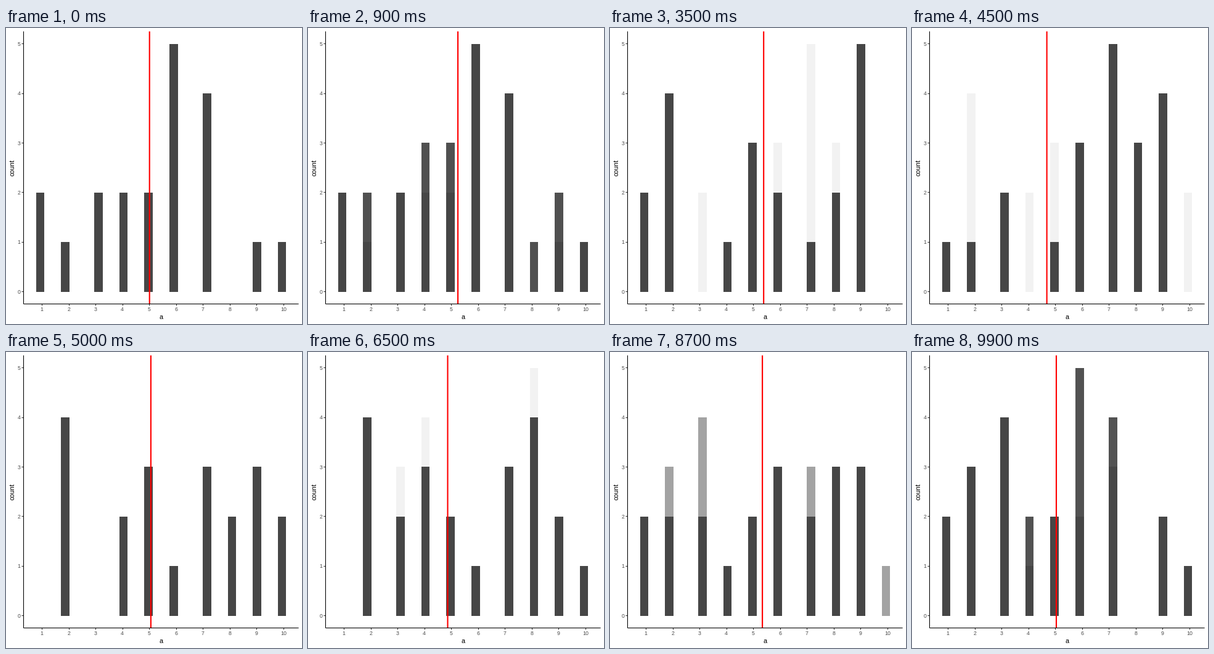
Animation of 480x480 px, one loop 10 s. Source, as a matplotlib script:

```python
import math

import matplotlib.pyplot as plt
from matplotlib.animation import FuncAnimation
from matplotlib.patches import Rectangle

plt.rcParams["font.family"] = "Liberation Sans"

SIZE = 480
LEFT, RIGHT, TOP, BOTTOM = 28.5, 474.5, 5.5, 447.7
STATES, STEP = 10, 10    # states in a loop, frames per state
BIN = 9 / 29             # 30 bins over the values 1 to 10

# Counts of the values 1 to 10; states left out lie between their neighbours
KEYS = {
    0: (2, 1, 2, 2, 2, 5, 4, 0, 1, 1),
    2: (2, 3, 1, 4, 4, 1, 2, 1, 2, 0),
    3: (2, 4, 0, 1, 3, 2, 1, 2, 5, 0),
    4: (1, 1, 2, 0, 1, 3, 5, 3, 4, 0),
    5: (0, 4, 0, 2, 3, 1, 3, 2, 3, 2),
    7: (0, 3, 3, 4, 1, 1, 2, 5, 1, 0),
    8: (2, 2, 2, 1, 2, 3, 2, 3, 3, 0),
    9: (2, 3, 4, 1, 2, 2, 3, 0, 2, 1),
}
MARKS = (5.0, 5.25, 6.05, 5.43, 4.65, 5.05, 4.75, 6.35, 5.22, 5.44)

CENTERS = [round(v / BIN) * BIN for v in range(1, 11)]
X_MIN, X_MAX = CENTERS[0] - BIN / 2, CENTERS[-1] + BIN / 2
PAD = 0.05 * (X_MAX - X_MIN)
X_UNIT = (RIGHT - LEFT) / (X_MAX - X_MIN + 2 * PAD)
Y_UNIT = (BOTTOM - TOP) / 5.5


def px(x):
    return LEFT + (x - X_MIN + PAD) * X_UNIT


def py(y):
    return BOTTOM - (y + 0.25) * Y_UNIT


def counts(state):
    if state in KEYS:
        return KEYS[state]
    pairs = zip(KEYS[state - 1], KEYS[state + 1])
    return [(a + b + 1) // 2 for a, b in pairs]


fig = plt.figure(figsize=(SIZE / 72, SIZE / 72), dpi=72, facecolor="white")
ax = fig.add_axes([0, 0, 1, 1])
ax.set_xlim(0, SIZE)
ax.set_ylim(SIZE, 0)
ax.axis("off")


def make_bars(zorder):
    return [ax.add_patch(Rectangle((px(c - BIN / 2), py(0)), BIN * X_UNIT, 0,
                                   facecolor="#464646", linewidth=0,
                                   zorder=zorder))
            for c in CENTERS]


def rule(x0, y0, x1, y1, color="black", zorder=5):
    # Whole coordinates snap to the centre of their pixel
    ax.plot([math.floor(x0), math.floor(x1)],
            [math.floor(y0), math.floor(y1)],
            color=color, lw=1.07, zorder=zorder, solid_capstyle="butt")


def label(x, y, text, size=8.8, color="#4d4d4d", ha="center", **style):
    ax.text(x, y, text, size=size, color=color, ha=ha, va="baseline", **style)


def draw_axes():
    for v in range(1, 11):
        rule(px(v), BOTTOM, px(v), BOTTOM + 2.75, "#333333", 4)
        label(px(v) - 0.5, 459, str(v))
    for v in range(6):
        rule(LEFT - 2.75, py(v), LEFT, py(v), "#333333", 4)
        label(LEFT - 4.95, py(v) + 3.1, str(v), ha="right")
    rule(LEFT, TOP, LEFT, BOTTOM)
    rule(LEFT, BOTTOM, RIGHT, BOTTOM)
    label((LEFT + RIGHT) / 2, 472, "a", 11, "black")
    label(13.7, (TOP + BOTTOM) / 2, "count", 11, "black",
          rotation=90, rotation_mode="anchor")


draw_axes()
old_bars = make_bars(1)
new_bars = make_bars(2)
mark, = ax.plot([0, 0], [TOP, BOTTOM], color="red", lw=2.13, zorder=3,
                solid_capstyle="butt", snap=False)


def progress(state, k):
    # Rest, then a sine ease; the first state rests one frame less
    rest = 4 if state else 3
    t = max(0, k - rest) / (STEP - rest)
    return (1 - math.cos(math.pi * t)) / 2


def update(frame):
    state, k = divmod(frame, STEP)
    after = (state + 1) % STATES
    t = progress(state, k)
    for bar, n in zip(old_bars, counts(state)):
        bar.set_height(-n * Y_UNIT)
    for bar, n in zip(new_bars, counts(after)):
        bar.set_height(-n * Y_UNIT)
        bar.set_alpha(t)
    x = px(MARKS[state] + (MARKS[after] - MARKS[state]) * t)
    mark.set_xdata([x, x])
    return old_bars + new_bars + [mark]


anim = FuncAnimation(fig, update, frames=STATES * STEP, interval=100,
                     repeat=True, repeat_delay=0, blit=False)
plt.show()
```
